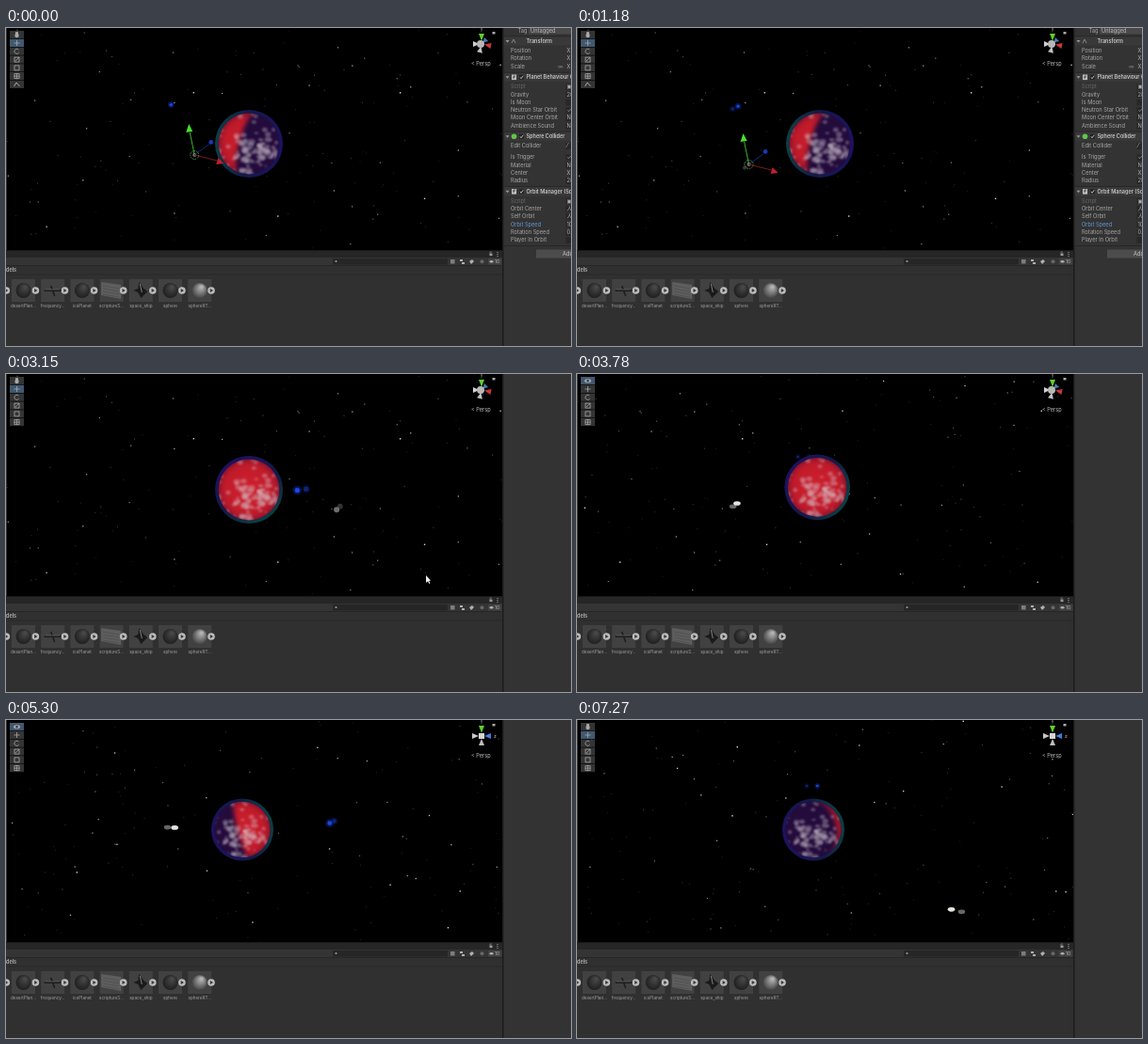
An HTML page with a canvas that plays this animation: 600x338 px, repeating every 7.3 s.

```html
<!DOCTYPE html>
<html lang="en">
<head>
<meta charset="utf-8">
<title>Planet orbit in a scene editor</title>
<style>
html, body { margin: 0; width: 100%; height: 100%; overflow: hidden; background: #000; }
canvas { display: block; width: 600px; height: 338px; }
</style>
</head>
<body>
<canvas id="stage" width="600" height="338"></canvas>
<script>
const g = document.getElementById('stage').getContext('2d');
const LOOP = 7300, TAU = Math.PI * 2, RAD = Math.PI / 180;
const DESELECT = 2700, DRAG_START = 3300, DRAG_MID = 4400, DRAG_END = 7000;

let seed = 11;
const rand = () => (seed = (seed * 16807) % 2147483647) / 2147483647;
const spread = () => rand() + rand() + rand() - 1.5;
const many = (n, make) => Array.from({ length: n }, make);

const stars = many(560, () => {
  const bright = rand() ** 3;
  return { x: rand() * 1830, y: rand() * 236, size: .8 + bright * .6, alpha: .2 + bright * .75 };
});
// One broad patch of cloud, plus a thin scatter around it
const puffs = many(95, (_, i) => {
  const wide = i > 62 ? 2.2 : .75;
  return { lon: .2 + spread() * wide, lat: .2 + spread() * wide * .8, size: .04 + rand() * .09 };
});

const clamp = k => Math.min(1, Math.max(0, k));
const ramp = (a, b, t) => clamp((t - a) / (b - a));
const ease = (a, b, t) => { const k = ramp(a, b, t); return k * k * (3 - 2 * k); };
const bell = (mid, width, t) => Math.exp(-(((t - mid) / width) ** 2));

function box(x, y, w, h, color) { g.fillStyle = color; g.fillRect(x, y, w, h); }
function disc(x, y, r, color, ry = r) {
  g.fillStyle = color;
  g.beginPath(); g.ellipse(x, y, r, ry, 0, 0, TAU); g.fill();
}
function poly(color, ...p) {
  g.fillStyle = color;
  g.beginPath();
  for (let i = 0; i < p.length; i += 2) g.lineTo(p[i], p[i + 1]);
  g.fill();
}
function line(color, width, ...p) {
  g.strokeStyle = color; g.lineWidth = width;
  g.beginPath();
  for (let i = 0; i < p.length; i += 2) g.lineTo(p[i], p[i + 1]);
  g.stroke();
}
function text(s, x, y, color = '#a8a8a8', size = 5.7, weight = 400, align = 'left') {
  g.font = `${weight} ${size}px Inter, Roboto, sans-serif`;
  g.textAlign = align; g.textBaseline = 'middle';
  g.fillStyle = color;
  g.fillText(s, x, y);
}

function orbit(angle, cx, cy, rx, ry, tilt) {
  const c = Math.cos(angle * RAD), s = Math.sin(angle * RAD);
  return { x: cx + rx * c, y: cy + ry * s + tilt * c, near: s };
}
function planetAt(t) {
  const turn = ease(DRAG_START, DRAG_MID, t);
  return { x: 258 - 7 * turn, y: 123 - 6.5 * turn, r: 36 - 3 * turn, turn };
}
function blueAt(t) {
  const angle = 218 + .305 * t - 38 * bell(3150, 1000, t);
  return orbit(angle, planetAt(t).x, 100, 105, 30 - 33 * bell(4390, 800, t), 0);
}
function moonAt(t) {
  const angle = 227 + .293 * t - 45 * ease(1200, 2200, t) - 110 * ease(DRAG_MID, 6200, t);
  const view = ramp(DRAG_START, DRAG_END, t);
  return orbit(angle, planetAt(t).x + 7, 146, 95 + 85 * view, 30 - 16 * view, -16 + 76 * view);
}

// Each body leaves a faint blended copy of its last position
function drawBodies(t, front) {
  for (const [lag, alpha] of [[20, .45], [0, 1]]) {
    const time = Math.max(0, t - lag), blue = blueAt(time), moon = moonAt(time);
    g.globalAlpha = alpha;
    if (blue.near > 0 === front) {
      const r = 2.9 + blue.near;
      disc(blue.x, blue.y, r + 1, 'rgba(14,30,120,.6)');
      disc(blue.x, blue.y, r * .7, '#1a48e6');
    }
    if (moon.near > 0 === front) {
      if (t < DRAG_START) disc(moon.x, moon.y, 2.6 + moon.near, '#6c6e70');
      else disc(moon.x, moon.y, 3.8, '#e4e4e0', 2.3);
    }
  }
  g.globalAlpha = 1;
}

function drawPlanet(t) {
  const { x, y, r, turn } = planetAt(t), R = r * .9;
  const dawn = ease(1500, 3150, t), dusk = ease(DRAG_MID, 6200, t);
  const light = 195 - 45 * dawn - 165 * turn;
  const rim = (185 - 130 * dawn - 70 * turn) * RAD;
  const phase = -.3 + 1.3 * dawn - 1.75 * dusk, lit = R + 3;
  const spin = -.25 * turn;
  g.save();
  g.translate(x, y);
  const c = Math.cos(rim) * r, s = Math.sin(rim) * r;
  const edge = g.createLinearGradient(c, s, -c, -s);
  edge.addColorStop(0, '#0b4044');
  edge.addColorStop(.45, '#121a48');
  edge.addColorStop(1, '#1c1260');
  disc(0, 0, r, edge);
  g.beginPath(); g.arc(0, 0, R, 0, TAU); g.clip();
  box(-r, -r, r * 2, r * 2, '#230b3c');

  g.save();
  g.rotate(light * RAD);
  const red = g.createRadialGradient(0, 0, R * .3, 0, 0, R);
  red.addColorStop(0, '#cb1e2c');
  red.addColorStop(.8, '#c01a2a');
  red.addColorStop(1, '#86142c');
  g.fillStyle = red;
  g.filter = 'blur(2.5px)';
  g.beginPath();
  g.arc(0, 0, lit, -TAU / 4, TAU / 4);
  g.ellipse(0, 0, Math.abs(phase) * lit, lit, 0, TAU / 4, phase < 0 ? -TAU / 4 : TAU * .75, phase < 0);
  g.fill();
  g.restore();

  g.filter = 'blur(1px)';
  for (const { lon, lat, size } of puffs) {
    const depth = Math.cos(lon + spin);
    if (depth > 0)
      disc(Math.cos(lat) * Math.sin(lon + spin) * R, Math.sin(lat) * R,
        size * R * (.4 + depth * .6), 'rgba(216,204,214,.36)', size * R * .75);
  }
  g.restore();
}

function drawHandle(t) {
  const { x, y } = moonAt(t);
  g.save();
  g.translate(x, y);
  line('#3fb22c', 1, 0, 0, -5, -24);
  poly('#48e02c', -6, -33, -9, -24, -2, -25);
  line('#16297a', 1, 0, 0, 15, -11);
  disc(17.5, -13.5, 2.4, '#1b38b4');
  line('#7a1820', 1, 0, 0, 24, 6);
  poly('#c01e2c', 31, 9, 23, 10, 25, 3);
  g.strokeStyle = '#62a85c'; g.lineWidth = .8;
  g.setLineDash([1.5, 1]);
  g.beginPath(); g.arc(0, 0, 4.5, 0, TAU); g.stroke();
  g.restore();
}

// A cone of the view compass: wide end outwards
function cone(dx, dy, color) {
  const d = Math.hypot(dx, dy), nx = -dy / d * 3, ny = dx / d * 3;
  poly(color, 505 + dx * .3, 17 + dy * .3, 505 + dx + nx, 17 + dy + ny, 505 + dx - nx, 17 + dy - ny);
}
function drawCompass(t) {
  if (t < DRAG_MID - 400) {
    cone(5, -5, '#4b78b8'); cone(-9, 0, '#d0d0d0'); cone(-2, 9, '#c2c2c2');
    cone(10, 2, '#c8363a');
    disc(504, 17, 4, '#b8b8b8');
  } else {
    cone(-10, 0, '#c8c8c8'); cone(0, 10, '#bdbdbd');
    cone(10, 0, '#3f7fe0');
    text('z', 518, 17, '#ccc', 5);
    box(502, 14, 6, 6, '#d4d4d4');
  }
  cone(0, -11, '#62cc2c');
  text('y', 504, 2, '#bbb', 4);
  box(516.5, 4, 3, 2.5, '#aaa');
  text('< Persp', 494, 38, '#c0c0c0', 5.6);
}

function drawTools(t) {
  const viewing = t >= DRAG_START && t < DRAG_END, ink = '#a8a8a8';
  const hand = m => { disc(11.5, m + .8, 2.2, ink); box(10, m - 3, 3, 4, ink); };
  const eye = m => { disc(11.5, m, 3.5, ink, 2); disc(11.5, m, 1.2, '#334'); };
  const frame = m => { g.strokeStyle = ink; g.lineWidth = .8; g.strokeRect(9, m - 2.5, 5, 5); };
  const cross = m => { line(ink, .8, 8.5, m, 14.5, m); line(ink, .8, 11.5, m - 3, 11.5, m + 3); };
  const icons = [
    viewing ? eye : hand,
    cross,
    m => { g.strokeStyle = ink; g.lineWidth = .8; g.beginPath(); g.arc(11.5, m, 2.6, .5, 5.6); g.stroke(); },
    m => { frame(m); line(ink, .8, 10, m + 1.5, 14, m - 2.5); },
    frame,
    m => { frame(m); cross(m); }
  ];
  if (t < DESELECT) icons.push(m => line(ink, 1, 8.5, m + 2, 11, m - 2, 14.5, m + 2));
  icons.forEach((icon, i) => {
    const y = 3 + i * 8.8;
    box(4, y, 15, 8.2, i === (viewing ? 0 : 1) ? '#405870' : '#343434');
    icon(y + 4.2);
  });
}

function ball(cx, cy, top, bottom) {
  const shade = g.createRadialGradient(cx + 2, cy - 4, 1, cx, cy, 9);
  shade.addColorStop(0, top);
  shade.addColorStop(1, bottom);
  disc(cx, cy, 8, shade);
}
function slab(cx, cy) {
  poly('#5e5e5e', cx - 11, cy - 9, cx + 10, cy - 6, cx + 10, cy + 9, cx - 11, cy + 5);
  for (let k = -5; k < 5; k += 3) line('#484848', .6, cx - 9, cy + k, cx + 8, cy + k + 3);
}
function station(cx, cy) {
  line('#1c1c1c', 2, cx - 9, cy, cx + 9, cy);
  line('#1c1c1c', 1.5, cx - 2, cy - 5, cx + 2, cy + 6);
  line('#666c74', .7, cx - 8, cy - 1, cx + 7, cy - 1);
}
function ship(cx, cy) {
  poly('#1a1a1a', cx - 2, cy - 9, cx + 3, cy - 2, cx + 7, cy + 1, cx, cy + 8, cx - 3, cy + 2, cx - 8, cy, cx - 3, cy - 2);
  line('#9a9a9a', .8, cx - 1, cy - 7, cx + 1, cy + 2);
}
const darkBall = (x, y) => ball(x, y, '#484848', '#1b1b1b');
const ASSETS = {
  'desertPlan…': darkBall, 'frequency…': station, 'icePlanet': darkBall, 'scriptureS…': slab,
  'space_ship': ship, 'sphere': darkBall, 'sphereRT…': (x, y) => ball(x, y, '#b4b4b4', '#3c3c3c')
};

function drawProject() {
  box(0, 236, 528, 102, '#303030');
  box(0, 236, 528, 1.2, '#1a1a1a');
  box(0, 237, 528, 7, '#262626');
  box(0, 244, 528, 8.5, '#343434');
  box(347, 245, 122, 6.5, '#262626');
  box(0, 252, 528, .7, '#222');
  box(0, 261.5, 528, .7, '#272727');
  text('dels', 0, 257, '#b0b0b0', 5.5, 600);
  box(513.5, 239.5, 3, 2.6, '#999');
  line('#999', .6, 514, 239.5, 514, 238, 516, 238);
  for (let y = 238; y < 243; y += 2) box(521.5, y, 1, 1, '#aaa');
  disc(350.5, 248, 1.1, '#999');
  box(472, 246, 4.5, 4.5, '#7e7e7e');
  box(482, 246, 3, 2, '#b0b0b0'); box(484, 249, 3, 2, '#b0b0b0');
  poly('#b0b0b0', 492, 248, 495, 246, 497, 248, 494, 251);
  disc(505.5, 248.3, 2, '#666');
  box(512, 245, 14, 6.5, '#424242');
  disc(515.5, 248.3, 2, '#b0b0b0', 1.3);
  text('10', 519, 248.5, '#b0b0b0', 5);
  Object.entries(ASSETS).forEach(([name, icon], i) => {
    const x = 6 + i * 31.2;
    box(x, 267, 25, 24, '#414141');
    icon(x + 12.5, 279);
    text(name, x + 12.5, 295.5, '#a0a0a0', 4.6, 400, 'center');
  });
  for (let i = 0; i < 8; i++) {
    const x = .3 + i * 31.1;
    disc(x, 279, 3.8, '#bcbcbc');
    poly('#333', x - 1.2, 277, x + 2, 279, x - 1.2, 281);
  }
}

// Component title, its height on the panel, and rows of "label|value"; an empty row is a small gap
const COMPONENTS = [
  ['Transform', 14, 'Position|X', 'Rotation|X', 'Scale|X'],
  ['Planet Behaviour (Script)', 52.3, 'Script|▣', 'Gravity|28', 'Is Moon|', 'Neutron Star Orbit|✓',
    'Moon Center Orbit|No', 'Ambience Sound|No'],
  ['Sphere Collider', 115.3, 'Edit Collider|⁄', '', 'Is Trigger|✓', 'Material|No', 'Center|X', 'Radius|28'],
  ['Orbit Manager (Script)', 173.8, 'Script|▣', 'Orbit Center|人', 'Self Orbit|人', 'Orbit Speed|10',
    'Rotation Speed|0.', 'Player In Orbit|']
];
function drawHeader(title, y) {
  box(529, y - 5, 71, 9.5, '#393939');
  box(529, y - 5.5, 71, .7, '#222');
  poly('#999', 530.5, y - 1, 534.5, y - 1, 532.5, y + 1.5);
  if (title === 'Transform') line('#999', .8, 537, y + 2, 539, y - 2, 541, y + 2);
  else {
    if (title === 'Sphere Collider') disc(539.5, y, 2.8, '#62c44a');
    else { box(537, y - 2.8, 5, 5.6, '#c4c4c4'); text('#', 538, y, '#444', 4.5, 700); }
    box(545, y - 2.5, 5, 5, '#222');
    line('#ddd', .8, 546, y, 547, y + 1.5, 549.3, y - 1.6);
  }
  text(title, 552.5, y + .3, '#c6c6c6', 5.5, 600);
}
function drawInspector() {
  text('Tag', 543.5, 3);
  box(555, -2, 45, 8.5, '#484848');
  text('Untagged', 557, 3, '#bbb');
  for (const [title, top, ...rows] of COMPONENTS) {
    drawHeader(title, top);
    let y = top + 10.2;
    for (const row of rows) {
      if (!row) { y += 3.8; continue; }
      const [label, value] = row.split('|');
      const color = label === 'Script' ? '#686868' : label === 'Orbit Speed' ? '#6a96da' : '#a8a8a8';
      if (value !== 'X') box(594.5, y - 3.3, 6, 6.6, '#272727');
      text(label, 536, y, color);
      text(value, 595.5, y, '#b0b0b0');
      y += 8.3;
    }
  }
  text('∞', 586, 41, '#888', 6);
  box(529, 231, 71, .7, '#222');
  box(563, 235.5, 37, 9, '#4c4c4c');
  text('Add Component', 591, 240, '#c6c6c6');
}

function drawCursor(t) {
  const k = ease(2450, 2900, t), x = 560 - 113 * k, y = 214 + 4 * k;
  poly('#eee', x - 1, y - 4, x - 1, y + 4, x + 1, y + 2.3, x + 2.4, y + 5, x + 3.4, y + 4.4, x + 2.2, y + 2, x + 4, y + 1.6);
}

function draw(t) {
  box(0, 0, 600, 338, '#000');
  const pan = 600 * ease(DRAG_START, DRAG_MID, t) + 700 * ease(DRAG_MID, 6950, t);
  for (const { x, y, size, alpha } of stars)
    if (x > pan && x < pan + 528)
      box(x - pan - size / 2, y - size / 2, size, size, `rgba(235,235,235,${alpha})`);
  drawBodies(t, false);
  drawPlanet(t);
  drawBodies(t, true);
  if (t < DESELECT) drawHandle(t);
  drawCompass(t);
  drawTools(t);
  box(0, 0, 1, 237, '#333');
  drawProject();
  box(527, 0, 73, 338, '#333');
  box(527, 0, 1.5, 338, '#1c1c1c');
  if (t < DESELECT) drawInspector();
  if (t > 2450 && t < DRAG_START) drawCursor(t);
}

const start = performance.now();
function tick() {
  const t = (performance.now() - start) % LOOP;
  draw(Math.floor(t / 30) * 30);
  requestAnimationFrame(tick);
}
tick();
</script>
</body>
</html>
```
